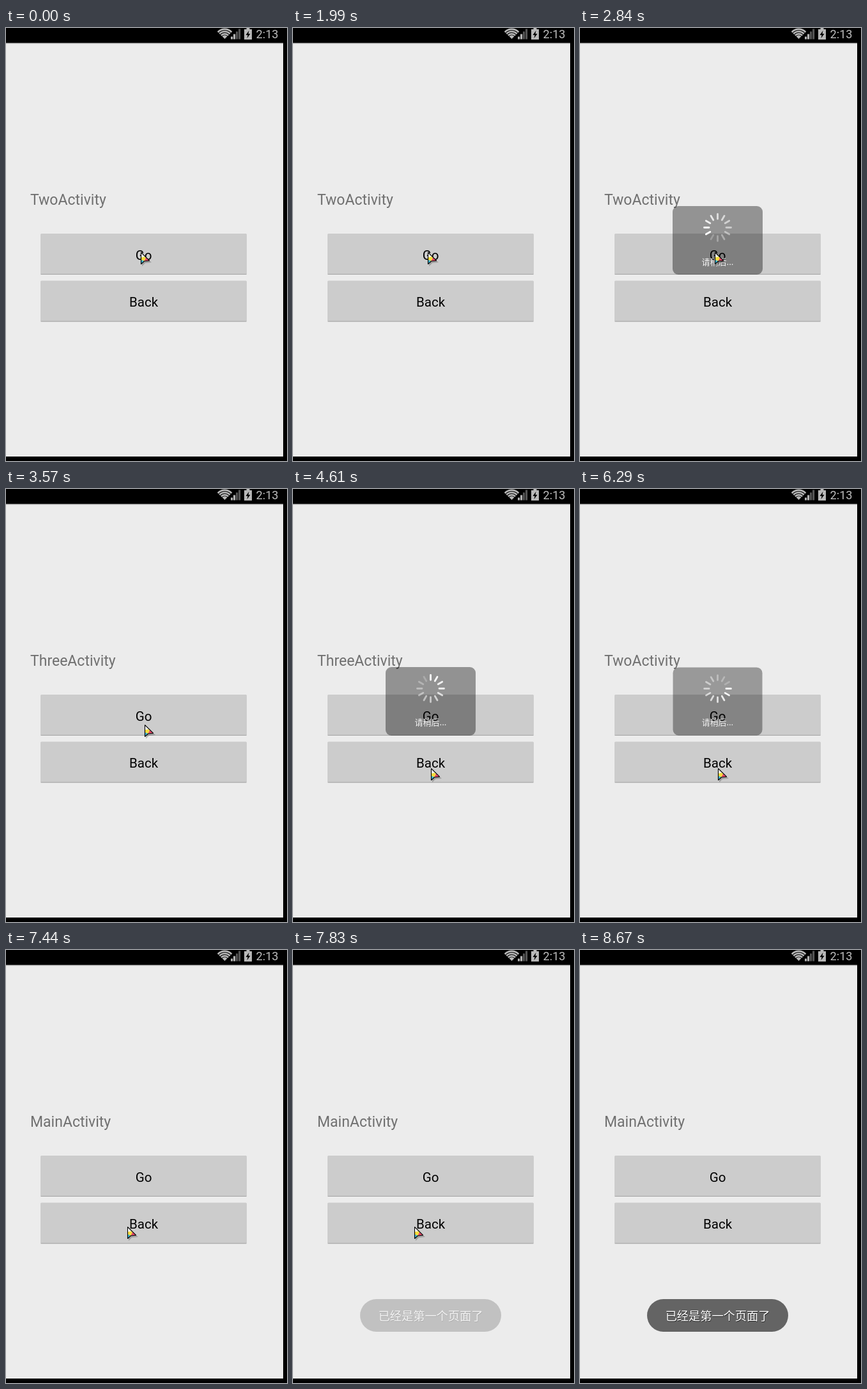
Recreate the animation shown at these times as an HTML page. Size 440 by 676 pixels, loop 9.68 s.

```html
<!DOCTYPE html>
<html lang="zh">
<head>
<meta charset="utf-8">
<style>
  html, body { margin: 0; width: 100%; height: 100%; overflow: hidden; background: #000; }
  svg { display: block; width: 440px; height: 676px; font-family: Roboto, sans-serif; }
  .cjk { font-family: "Noto Sans CJK SC", "Noto Sans CJK", sans-serif; fill: #fff; text-anchor: middle; }
</style>
</head>
<body>
<svg id="stage" viewBox="0 0 440 676"></svg>
<script>
const LOOP = 9680;
const stage = document.getElementById('stage');

const button = (id, label, y) => `
  <rect id="${id}" x="54" y="${y}" width="323" height="64" rx="1.5" fill="#ccc"/>
  <path d="M54.5 ${y + 63.5}h322" stroke="#a2a2a2"/>
  <text x="215.6" y="${y + 40.5}" font-size="20.5" text-anchor="middle">${label}</text>`;

const screen = id => `
  <g id="${id}">
    <rect y="23" width="434" height="646" fill="#ececec"/>
    <text id="${id}Title" x="38" y="276" font-size="23" fill="#707070"></text>
    ${button(id + 'Go', 'Go', 321)}
    ${button(id + 'Back', 'Back', 394.5)}
  </g>`;

const spokes = Array.from({length: 12}, (_, i) =>
  `<path d="M0-13.5V-21" transform="rotate(${i * 30})" opacity="${1 - i * 0.07}"/>`).join('');

// A wifi band: a quarter ring around the icon's foot.
const band = r => `<path d="M${342.5 - r * 0.72} ${17 - r * 0.7}a${r} ${r} 0 0 1 ${r * 1.44} 0"/>`;

const bars = [0, 1, 2, 3].map(i =>
  `<rect x="${352 + i * 4}" y="${13.5 - i * 4}" width="3.2" height="${4 + i * 4}" fill="${i < 2 ? '#b4b4b4' : '#555'}"/>`).join('');

stage.innerHTML = `
  <rect width="440" height="676"/>
  <g fill="none" stroke="#b8b8b8" stroke-width="2.6">${[15, 11.4, 7.8].map(band).join('')}</g>
  <path d="M342.5 17l-4-4a5.5 5.5 0 0 1 8 0z" fill="#b8b8b8"/>
  ${bars}
  <path d="M373 2h3.5v-2h5v2h3.5v16h-12z" fill="#b8b8b8"/>
  <path d="M380.5 4l-5 7h3l-1 5 5-7h-3z"/>
  <text x="391.5" y="16.3" font-size="18.2" fill="#bcbcbc">2:13</text>
  ${screen('base')}
  <rect id="dim" y="23" width="434" height="646"/>
  ${screen('top')}
  <rect y="23" width="434" height="1" opacity=".45"/>
  <rect y="24" width="434" height="1" opacity=".12"/>
  <rect y="667" width="434" height="1.5" fill="#fafafa"/>
  <g id="dialog">
    <rect x="145" y="278" width="141" height="107" rx="9" opacity=".38"/>
    <g id="spinner" stroke="#fff" stroke-width="2.8" stroke-linecap="round">${spokes}</g>
    <text class="cjk" x="215.5" y="369.5" font-size="13" opacity=".9">请稍后...</text>
  </g>
  <g id="toast">
    <rect x="105" y="545" width="221" height="51" rx="25.5" fill="#646464"/>
    <text class="cjk" x="216" y="578.5" font-size="18.2" style="fill:#222">已经是第一个页面了</text>
    <text class="cjk" x="215.5" y="577.5" font-size="18.2">已经是第一个页面了</text>
  </g>
  <g id="cursor">
    <path d="M2 3v19l5-5 10-1z" opacity=".22"/>
    <path d="M.5 .5v18l5-4.5 8-.8z" fill="#fff"/>
    <path d="M.5 8l6-1 2 3-3 4-5-1z" fill="#f6dc3c"/>
    <path d="M.5 12l4.5 1.5-4.5 5z" fill="#3cb8d8"/>
    <path d="M8 8.5l5.5 4.7-8 .8z" fill="#e8486a"/>
    <path d="M.5 .5v18l5-4.5 8-.8z" fill="none" stroke="#000" stroke-width="1.1" stroke-linejoin="round"/>
  </g>`;

const part = Object.fromEntries([...stage.querySelectorAll('[id]')].map(e => [e.id, e]));
const set = (id, name, value) => part[id].setAttribute(name, value);

// The screen refreshes in runs: first moment, last moment, number of refreshes.
const refreshes = [[0, 0, 1], [1120, 1120, 1], [1990, 2990, 8], [3140, 3260, 2], [3570, 4610, 9],
  [4730, 5750, 8], [5870, 6830, 8], [6980, 7970, 8], [8120, 8670, 5]]
  .flatMap(([from, to, n]) => Array.from({length: n}, (_, i) => from + (to - from) * i / Math.max(1, n - 1)));

const clamp = v => Math.min(1, Math.max(0, v));
const ease = (t, start, length = 300) => 1 - (1 - clamp((t - start) / length)) ** 5;
const within = (t, from, to) => t >= from && t < to;

const cursorPath = [[0, 211, 350], [3260, 211, 350], [3570, 217, 368], [3830, 215, 453], [4090, 216, 436],
  [6560, 216, 436], [7120, 190, 432], [7970, 190, 432], [8120, 212, 452], [8532, 394, 664], [8670, 425, 700]];

function cursorAt(t) {
  const i = cursorPath.findIndex(p => p[0] > t);
  if (i < 0) return cursorPath.at(-1).slice(1);
  const [a, b] = [cursorPath[i - 1], cursorPath[i]];
  const k = (t - a[0]) / (b[0] - a[0]);
  return [1, 2].map(n => Math.round(a[n] + (b[n] - a[n]) * k));
}

const dialogs = [[2090, 2950], [4440, 5520], [6200, 7100]];

function place(id, scale, opacity) {
  set(id, 'transform', `translate(217 334) scale(${scale}) translate(-217 -334)`);
  set(id, 'opacity', opacity);
}

function paint(id, pressed) {
  set(id, 'fill', pressed ? '#b0b0b0' : '#ccc');
}

function render(t) {
  const late = t >= 5850;
  const shown = late ? 1 - ease(t, 7090) : ease(t, 2950) - ease(t, 5500);
  part.baseTitle.textContent = late ? 'MainActivity' : 'TwoActivity';
  part.topTitle.textContent = late ? 'TwoActivity' : 'ThreeActivity';
  place('top', 0.8 + 0.2 * shown, shown);
  set('dim', 'opacity', within(t, 2950, 3250) ? 0.3 * shown : 0);

  paint('baseGo', within(t, 1120, 1990));
  paint('topBack', within(t, 4200, 4470) || within(t, 5990, 6270));
  paint('baseBack', within(t, 7540, 7760));

  const [open, close] = dialogs.find(d => t < d[1] + 300) || dialogs[2];
  const leaving = ease(t, close);
  place('dialog', (0.9 + 0.1 * ease(t, open, 200)) * (1 - 0.2 * leaving), ease(t, open, 200) * (1 - leaving));
  const turn = Math.floor((t - 2840) / 1385 * 12 + 0.5) * 30 - 90;
  set('spinner', 'transform', `translate(215.5 311.5) rotate(${turn})`);

  set('toast', 'opacity', ease(t, 7800, 400));
  set('cursor', 'transform', `translate(${cursorAt(t)})`);
}

function tick() {
  const now = performance.now() % LOOP;
  render(refreshes.findLast(r => r <= now));
  requestAnimationFrame(tick);
}
tick();
</script>
</body>
</html>
```
